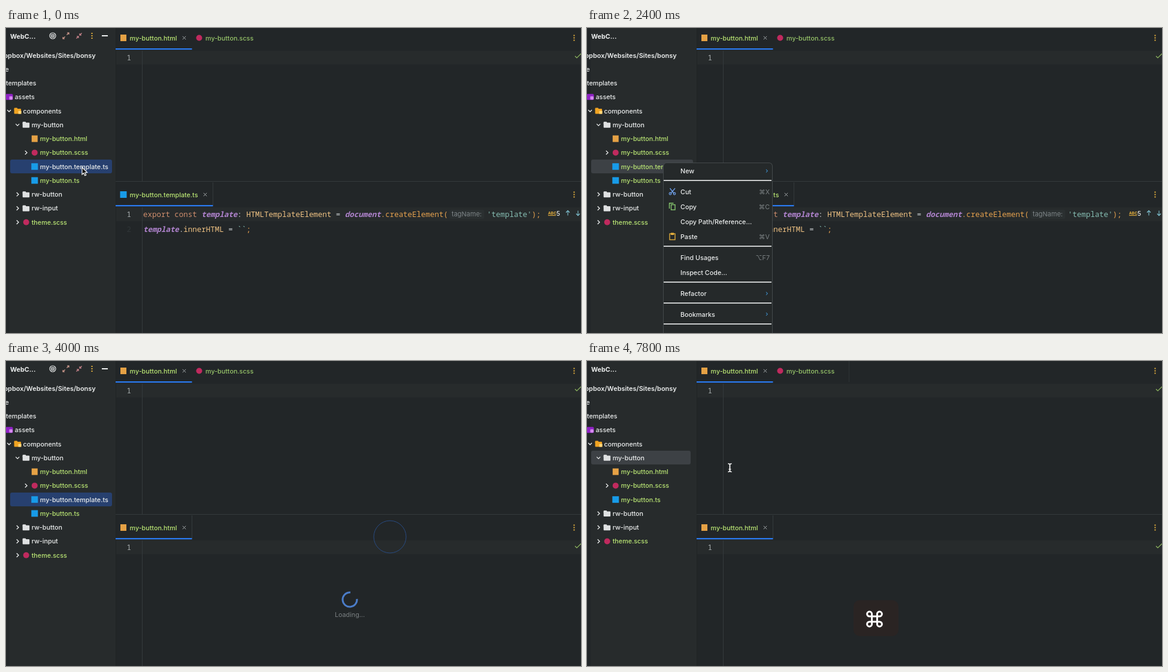
These frames come from a looping animation (960 px wide and 510 px high, 8 s). An HTML page with a canvas:

```html
<!DOCTYPE html>
<html lang="en">
<head>
<meta charset="utf-8">
<title>Editor</title>
<style>
html, body { margin: 0; width: 100%; height: 100%; overflow: hidden; background: #222628; }
canvas { display: block; width: 100vw; height: 100vh; }
</style>
</head>
<body>
<canvas id="stage" width="960" height="510"></canvas>
<script>
const ctx = document.getElementById('stage').getContext('2d');
const LOOP = 8000, STEP = 200;
const UI = 'Inter, "DejaVu Sans", sans-serif';
const MONO = '"Noto Sans Mono", "DejaVu Sans Mono", monospace';
const CHAR = 7.485;
const C = {
  editor: '#222628', side: '#272b2c', caretRow: '#272b2c', line: '#343a3c', dimBg: '#131414',
  text: '#eceeee', green: '#bae674', blue: '#2a7af0', select: '#27406f', grey: '#3d4145',
  gold: '#e9b23d', keyword: '#cf8e6d', orange: '#e5a14e', purple: '#b184cf', type: '#efc283',
  string: '#86bdb2', plain: '#c9cdcf'
};

function box(x, y, w, h, fill, r = 0) {
  ctx.fillStyle = fill;
  ctx.beginPath();
  ctx.roundRect(x, y, w, h, r);
  ctx.fill();
}

function dot(x, y, r, fill) {
  ctx.fillStyle = fill;
  ctx.beginPath();
  ctx.arc(x, y, r, 0, Math.PI * 2);
  ctx.fill();
}

function ring(x, y, r, color, width) {
  ctx.strokeStyle = color;
  ctx.lineWidth = width;
  ctx.beginPath();
  ctx.arc(x, y, r, 0, Math.PI * 2);
  ctx.stroke();
}

function path(points, color, width = 1.3) {
  ctx.strokeStyle = color;
  ctx.lineWidth = width;
  ctx.beginPath();
  points.forEach(([x, y]) => ctx.lineTo(x, y));
  ctx.stroke();
}

// y is the middle of the text line
function label(s, x, y, color = C.text, { size = 10.75, weight = 500, align = 'left' } = {}) {
  ctx.font = `${weight} ${size}px ${UI}`;
  ctx.textAlign = align;
  ctx.fillStyle = color;
  ctx.fillText(s, x, y + 4);
}

function code(s, x, y, color, style = '500') {
  ctx.font = `${style} 12.475px ${MONO}`;
  ctx.textAlign = 'left';
  ctx.fillStyle = color;
  ctx.fillText(s, x, y + 4.5);
  return x + s.length * CHAR;
}

function codeRun(parts, x, y) {
  parts.forEach(([s, color, style]) => { x = code(s, x, y, color, style); });
}

function icon(kind, x, y) {
  if (kind === 'html') box(x - 5, y - 5.5, 10, 11, '#e5a145');
  if (kind === 'scss') dot(x, y, 5, '#c02a5e');
  if (kind === 'ts') box(x - 5.5, y - 5.5, 11, 11, '#189be8');
  if (kind === 'assets') {
    box(x - 6, y - 5, 12, 10, '#8f22c4', 2);
    box(x, y - 1, 5.5, 5.5, '#d58af0', 1);
  }
  if (kind === 'folder' || kind === 'parts') {
    const fill = kind === 'parts' ? '#f0a322' : '#dfe1e2';
    box(x - 6, y - 5, 5.5, 4, fill, 1);
    box(x - 6, y - 3.5, 11.5, 8.5, fill, 1);
    if (kind === 'parts') box(x + 1, y, 5, 5, '#ffd77a');
  }
}

function chevron(x, y, open) {
  path(open ? [[x - 3, y - 1.5], [x, y + 1.5], [x + 3, y - 1.5]]
            : [[x - 1.5, y - 3.2], [x + 1.8, y], [x - 1.5, y + 3.2]], C.text);
}

function arrow(x, y, dx, dy, color, head = 3) {
  const ex = x + dx, ey = y + dy;
  path([[x, y], [ex, ey]], color, 1.1);
  if (dx) path([[ex - Math.sign(dx) * head, ey], [ex, ey], [ex, ey - Math.sign(dy) * head]], color, 1.1);
  else path([[x - head, ey - Math.sign(dy) * head], [x, ey], [x + head, ey - Math.sign(dy) * head]], color);
}

function kebab(x, y) {
  [-4, 0, 4].forEach(d => box(x - 1, y + d - 1, 2, 2, C.gold));
}

const cross = (x, y) => {
  path([[x - 2.7, y - 2.7], [x + 2.7, y + 2.7]], '#a8adaf', 1);
  path([[x - 2.7, y + 2.7], [x + 2.7, y - 2.7]], '#a8adaf', 1);
};

const check = y => path([[950, y], [953, y + 3], [960, y - 4]], '#8fb860', 1.2);

const ROW = 23.27, TOP = 45.5;
const TREE = [
  [0, 'assets', 'assets', ''],
  [1, 'parts', 'components', 'open'],
  [2, 'folder', 'my-button', 'open'],
  [3, 'html', 'my-button.html', ''],
  [3, 'scss', 'my-button.scss', 'shut'],
  [3, 'ts', 'my-button.template.ts', ''],
  [3, 'ts', 'my-button.ts', ''],
  [2, 'folder', 'rw-button', 'shut'],
  [2, 'folder', 'rw-input', 'shut'],
  [2, 'scss', 'theme.scss', 'shut']
];

function sidebar(s) {
  label('WebC...', 7, 13.5, C.text, { weight: 700 });
  if (s.tools) {
    ring(78, 13, 5, C.text, 1.2);
    ring(78, 13, 2.5, C.text, 1.2);
    dot(78, 13, 1, C.text);
    arrow(101.5, 11.5, 3.5, -3.5, '#e0a596');
    arrow(98.5, 14.5, -3.5, 3.5, '#e0a596');
    arrow(126.5, 8.5, -3.5, 3.5, '#dd8f98');
    arrow(117.5, 17.5, 3.5, -3.5, '#dd8f98');
    kebab(143.5, 13);
    box(160, 12, 10, 2, C.text);
  }
  label('opbox/Websites/Sites/bonsy', 149.7, TOP, C.text, { weight: 600, size: 10.95, align: 'right' });
  label('e', -1.5, TOP + ROW);
  label('templates', 0, TOP + 2 * ROW);

  const rows = s.deleted ? TREE.filter(r => r[2] !== 'my-button.template.ts') : TREE;
  const chosen = s.deleted ? 'my-button' : 'my-button.template.ts';
  rows.forEach(([level, kind, name, fold], i) => {
    const y = TOP + (i + 3) * ROW, x = 14.5 + level * 14.1;
    const on = name === chosen;
    if (on) box(7, Math.round(y - 11.7), s.deleted ? 166 : 170, 23, s.treeFocus ? C.select : C.grey, 3);
    if (fold) chevron(x - 23.5, y, fold === 'open');
    icon(kind, x - 9, y);
    const isFile = /\./.test(name);
    label(name, x, y, isFile && !(on && s.treeFocus) ? C.green : C.text);
  });
}

function tab(kind, name, x, y, width, active) {
  icon(kind, x + 13, y);
  label(name, x + 23.5, y, active ? C.green : '#98c66a');
  if (active) {
    box(x, y + 17.5, width, 2.2, C.blue);
    cross(x + width - 13, y);
  }
}

function editors(s) {
  if (!s.dim) {
    [38, 300].forEach(y => box(184, y, 776, 23, C.caretRow));
    box(183, 256, 777, 1, C.line);
    box(227, 38, 1, 218, C.line);
    box(227, 300, 1, 210, C.line);
    box(183 + (s.loaded ? 127 : 162), 258, 1, 39, C.line);
    if (s.deleted) box(437, 0, 1, 35, '#2d3234');
  }
  tab('html', 'my-button.html', 183, 16.5, 127.5, true);
  tab('scss', 'my-button.scss', 309.5, 16.5, 0, false);
  kebab(948.5, 16.5);
  code('1', 201.5, 49, '#a5abad');
  check(47);

  kebab(948.5, 278.5);
  code('1', 201.5, 311.5, '#a5abad');
  if (s.loaded) {
    tab('html', 'my-button.html', 183, 278.5, 127.5, true);
    check(309.5);
    return;
  }
  tab('ts', 'my-button.template.ts', 183, 278.5, 162.5, true);
  if (!s.dim) code('2', 201.5, 336.5, '#303638');
  const it = 'italic 700';
  codeRun([['export const ', C.keyword], ['template', C.purple, it], [': ', C.plain],
    ['HTMLTemplateElement', C.type], [' = ', C.plain], ['document', C.purple, it],
    ['.createElement(', C.orange]], 229, 311.5);
  box(740.5, 304, 58, 15, s.dim ? '#191b1b' : '#2b3031', 3);
  label('tagName:', 744, 311, '#7d8487', { size: 11, weight: 400 });
  codeRun([["'template'", C.string], [');', C.orange]], 803, 311.5);
  codeRun([['template', C.purple, it], ['.', C.plain], ['innerHTML', C.type], [' = ', C.plain],
    ['``', C.string], [';', C.orange]], 229, 336.5);
  label('ABC', 905, 308, C.gold, { size: 6.5, weight: 700 });
  box(905, 313, 13, 1, C.gold);
  label('5', 919, 309.5, C.text, { size: 10 });
  arrow(938, 313.5, 0, -8, '#7fc0d0');
  arrow(955, 305.5, 0, 8, '#7fc0d0');
}

// each entry: middle line, text, shortcut ('>' opens a submenu)
const MENU = [
  [239, 'New', '>'], [274, 'Cut', '⌘X'], [299, 'Copy', '⌘C'], [324, 'Copy Path/Reference...', ''],
  [349, 'Paste', '⌘V'], [384, 'Find Usages', '⌥F7'], [409, 'Inspect Code...', ''],
  [444, 'Refactor', '>'], [478.5, 'Bookmarks', '>'], [513.5, 'Reformat Code', '⌥⌘L']
];

function menu(pointerY) {
  box(127, 225, 183, 320, '#44494b', 6);
  box(128, 226, 181, 318, '#25292a', 5);
  [255, 365, 425, 460, 495].forEach(y => box(128, y - 1, 180, 1.7, '#dfe1e1'));
  MENU.forEach(([y, name, key]) => {
    if (Math.abs(pointerY - y) <= 12.5) box(132, y - 12.3, 174, 24, C.select, 3);
    label(name, 156, y);
    if (key === '>') path([[299, y - 2.5], [301.3, y], [299, y + 2.5]], '#3f8fca', 1.1);
    else label(key, 305, y, '#7c8284', { weight: 400, align: 'right' });
  });
  // scissors
  path([[138.5, 268], [145.5, 277]], '#6f9fe8');
  path([[147, 268], [139.5, 277]], '#6f9fe8');
  ring(139, 277, 1.8, '#6f9fe8', 1.2);
  ring(146, 277, 1.8, '#6f9fe8', 1.2);
  // copy
  ctx.lineWidth = 1.3;
  ctx.strokeStyle = '#8ccf72';
  ctx.strokeRect(140.5, 295.5, 6.5, 8.5);
  path([[137.5, 302], [137.5, 293], [144.5, 293]], '#8ccf72');
  // clipboard
  ctx.strokeStyle = C.gold;
  ctx.strokeRect(138, 344, 9, 10);
  box(140, 342.5, 5, 3.5, C.gold);
}

function checkbox(x, y, name, color) {
  ctx.strokeStyle = color;
  ctx.lineWidth = 1.2;
  ctx.strokeRect(x, y - 5.5, 11, 11);
  label(name, x + 16, y, color);
}

function dialog() {
  ctx.save();
  ctx.shadowColor = 'rgba(0,0,0,.7)';
  ctx.shadowBlur = 34;
  ctx.shadowOffsetY = 12;
  box(283, 176, 396, 128, '#565859', 8);
  ctx.restore();
  box(284, 177, 394, 126, '#25292a', 7);
  box(284, 177, 394, 21, '#333637', [7, 7, 0, 0]);
  ['#fe5f58', '#4b4d4e', '#2bc840'].forEach((c, i) => dot(295 + i * 16.5, 187.5, 5.2, c));
  label('Delete', 481, 187, '#b4b7b8', { weight: 600, align: 'center' });
  label('Delete file "my-button.template.ts"?', 300, 210);
  checkbox(305, 233, 'Safe delete (with usage search)', C.text);
  checkbox(305, 256.7, 'Search in comments and strings', '#65696b');
  checkbox(504, 256.7, 'Search for text occurrences', '#65696b');
  ring(303, 285, 5.4, '#d23a62', 1.4);
  label('?', 303, 284.5, '#d23a62', { size: 9, weight: 700, align: 'center' });
  label('CANCEL', 570, 284.5, '#f2f3f3', { weight: 700, size: 10.2, align: 'center' });
  box(612, 272, 56, 24, '#117aff', 3);
  label('OK', 640, 284.5, '#fff', { weight: 700, size: 10.2, align: 'center' });
}

function loading() {
  ctx.strokeStyle = '#4b7cc8';
  ctx.lineWidth = 3;
  ctx.beginPath();
  ctx.arc(574, 399, 12, -0.1, 4.8);
  ctx.stroke();
  label('Loading...', 574, 424, '#7b8183', { weight: 400, align: 'center' });
}

function commandKey() {
  box(445, 400, 75, 60, '#2a2423', 10);
  ctx.save();
  ctx.translate(480, 431.5);
  const a = 4.4, r = 4, c = a + r;
  for (let i = 0; i < 4; i++) {
    ctx.strokeStyle = '#fff';
    ctx.lineWidth = 3;
    ctx.beginPath();
    ctx.moveTo(-a, -a);
    ctx.lineTo(a, -a);
    ctx.lineTo(a, -c);
    ctx.arc(c, -c, r, Math.PI, Math.PI * 2.5);
    ctx.lineTo(a, -a);
    ctx.stroke();
    ctx.rotate(Math.PI / 2);
  }
  ctx.restore();
}

function pointer(x, y) {
  ctx.beginPath();
  [[0, 0], [0, 12], [2.7, 9.6], [4.6, 13.8], [6.7, 12.9], [4.9, 8.9], [8.5, 8.6]]
    .forEach(([dx, dy]) => ctx.lineTo(x + dx, y + dy));
  ctx.closePath();
  ctx.fillStyle = '#0a0a0a';
  ctx.fill();
  ctx.strokeStyle = '#fff';
  ctx.lineWidth = 1.2;
  ctx.stroke();
}

function textPointer(x, y) {
  path([[x - 3, y - 7], [x, y - 6], [x, y + 6], [x - 3, y + 7]], '#fff', 1.4);
  path([[x + 3, y - 7], [x, y - 6], [x, y + 6], [x + 3, y + 7]], '#fff', 1.4);
  path([[x - 2, y + 2.5], [x + 2, y + 2.5]], '#fff', 1.2);
}

const MOVES = [
  [0, 127, 233], [600, 127, 233], [1200, 178, 466], [1600, 190, 560], [2600, 190, 560],
  [3400, 641, 293], [4200, 641, 293], [4800, 287.5, 177], [6200, 287.5, 177],
  [7400, 238.5, 178.5], [LOOP, 238.5, 178.5]
];

function pointerAt(t) {
  const i = MOVES.findIndex(m => m[0] > t);
  const [t0, x0, y0] = MOVES[i - 1], [t1, x1, y1] = MOVES[i];
  const k = (t - t0) / (t1 - t0), e = k * k * (3 - 2 * k);
  return [x0 + (x1 - x0) * e, y0 + (y1 - y0) * e];
}

function draw(t) {
  const within = (a, b) => t >= a && t < b;
  const s = {
    dim: within(2600, 4000),
    loaded: t >= 4000,
    deleted: t >= 4200,
    tools: t < 400 || within(4000, 5000),
    treeFocus: t < 400 || within(3800, 5000)
  };
  const [x, y] = pointerAt(t);

  ctx.globalAlpha = 1;
  box(0, 0, 960, 510, s.dim ? C.dimBg : C.editor);
  if (!s.dim) {
    box(6, 0, 177, 510, C.side);
    box(183, 0, 1, 510, '#1f2324');
  }
  ctx.globalAlpha = s.dim ? 0.62 : 1;
  sidebar(s);
  editors(s);
  ctx.globalAlpha = 1;

  if (within(400, 2600)) menu(y);
  if (within(2600, 3800)) dialog();
  if (within(4000, 4200)) loading();
  if (t >= 5200) commandKey();
  if (within(3800, 4000)) ring(641, 294, 18, '#2058a6', 3);
  if (within(4000, 4200)) ring(641, 294, 27, '#284b82', 1);
  if (t < 4000) pointer(x, y);
  else if (t >= 4200) textPointer(x, y);
}

function frame(now) {
  draw(Math.floor(now % LOOP / STEP) * STEP);
  requestAnimationFrame(frame);
}
requestAnimationFrame(frame);
</script>
</body>
</html>
```
